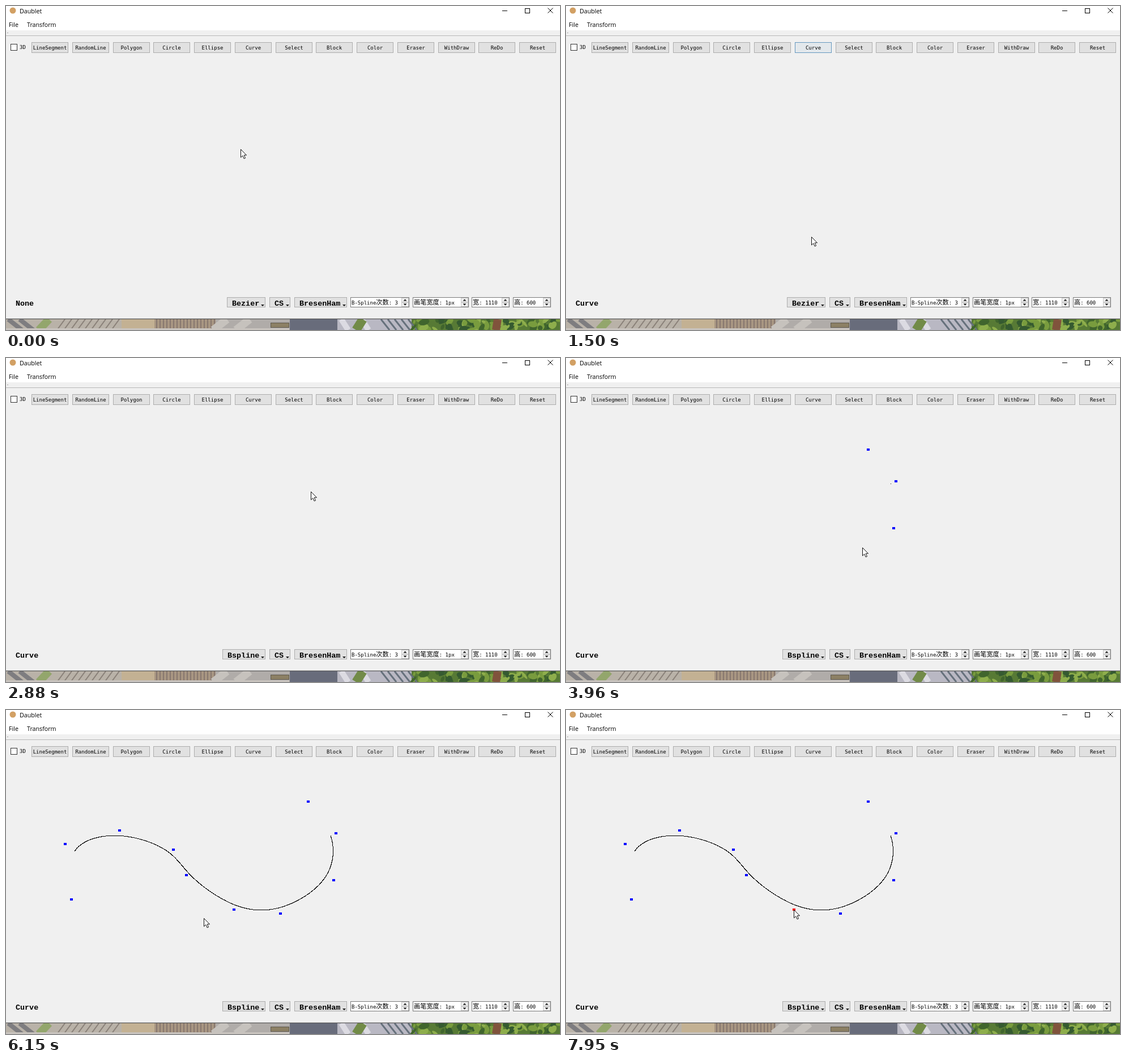
These frames come from a looping animation (978x573 px, 8000 ms). An HTML page with a canvas:

```html
<!DOCTYPE html>
<html lang="en">
<head>
<meta charset="utf-8">
<title>Daublet</title>
<style>
html, body { margin: 0; width: 978px; height: 573px; overflow: hidden; background: #f0f0f0; }
canvas { display: block; }
</style>
</head>
<body>
<canvas id="stage" width="978" height="573"></canvas>
<script>
const ctx = document.getElementById('stage').getContext('2d');
const LOOP = 8000;
const UI = '10.7px "Open Sans", sans-serif';
const MONO = '9px "DejaVu Sans Mono", monospace';
const CJK = '11.2px "Noto Sans CJK SC", "Noto Sans CJK", sans-serif';
const BOLD = 'bold 13.4px "Liberation Mono", monospace';
const TOOLS = ['LineSegment', 'RandomLine', 'Polygon', 'Circle', 'Ellipse', 'Curve', 'Select',
  'Block', 'Color', 'Eraser', 'WithDraw', 'ReDo', 'Reset'];

const stop = (x, y, arrive, leave = arrive) => ({ x, y, arrive, leave });

// The pointer clicks a control point when it leaves it
const POINTS = [
  stop(533, 162, 3060, 3100), stop(582, 218, 3410, 3440), stop(578, 301, 3700, 3750),
  stop(484, 360, 4130), stop(402, 353, 4440), stop(318, 292, 4720), stop(295, 247, 4940, 5090),
  stop(200, 213, 5260, 5410), stop(104, 237, 5620), stop(115, 335, 5850)];
const STOPS = [
  stop(414, 253, 0, 80), stop(436, 76, 820, 1060), stop(432, 523, 1720, 1970),
  stop(440, 562, 2300, 2610), stop(538, 236, 2880),
  ...POINTS,
  stop(373, 371, 6220), stop(431, 365, 6450), stop(401, 354, 6880, 7400), stop(402, 353, 7950, LOOP)];
const SELECTED = 4, SELECT_TIME = 7690;
const CLICK_TOOL = 970, CURVE_MODE = 1060, MENU_OPEN = 1970, MENU_CLOSE = 2610;

const ramp = (t, from, to) => Math.max(0, Math.min(1, (t - from) / (to - from)));
const mix = (a, b, k) => `rgb(${a.map((v, i) => Math.round(v + (b[i] - v) * k))})`;

function rect(x, y, w, h, color) {
  ctx.fillStyle = color;
  ctx.fillRect(x, y, w, h);
}

function frame(x, y, w, h, fill, border) {
  rect(x, y, w, h, border);
  rect(x + 1, y + 1, w - 2, h - 2, fill);
}

function poly(points, fill) {
  ctx.beginPath();
  points.forEach(p => ctx.lineTo(p[0], p[1]));
  ctx.closePath();
  ctx.fillStyle = fill;
  ctx.fill();
}

// Triangle around a middle point; a negative height points up
function arrow(x, y, height) {
  poly([[x - 3, y - height / 2], [x + 3, y - height / 2], [x, y + height / 2]], '#111');
}

function line(x1, y1, x2, y2, color, width = 1) {
  ctx.strokeStyle = color;
  ctx.lineWidth = width;
  ctx.beginPath();
  ctx.moveTo(x1, y1);
  ctx.lineTo(x2, y2);
  ctx.stroke();
}

function text(str, x, y, font, align = 'left') {
  ctx.font = font;
  ctx.textAlign = align;
  ctx.fillStyle = '#000';
  ctx.fillText(str, x, y);
}

function mixedText(str, x, y) {
  for (const run of str.match(/[\u4e00-\u9fff]+|[^\u4e00-\u9fff]+/g)) {
    text(run, x, y, run.charCodeAt(0) > 255 ? CJK : MONO);
    x += ctx.measureText(run).width;
  }
}

function button(x, y, w, h, hover = 0, pressed = false) {
  if (pressed) frame(x, y, w, h, '#cce4f7', '#005499');
  else frame(x, y, w, h, mix([225, 225, 225], [229, 241, 251], hover), mix([173, 173, 173], [0, 120, 215], hover));
}

function comboButton(label, x, right, hover, pressed) {
  button(x, 515, right - x, 18, hover, pressed);
  text(label, x + 9, 530, BOLD);
  arrow(right - 5, 529.5, 3);
}

function spinBox(label, x, right) {
  frame(x, 515, right - x, 18, '#fff', '#7a7a7a');
  mixedText(label, x + 2, 528);
  for (const side of [-1, 1]) {
    frame(right - 14, 520 + side * 4, 13, 8, '#f0f0f0', '#c8c8c8');
    arrow(right - 7.5, 524 + side * 4, side * 3);
  }
}

// Blurred street scene under the window: plain zones with seeded slanted strokes and leaves
function wallpaper() {
  let seed = 7;
  const rnd = (low, high) => low + (seed = seed * 16807 % 2147483647) / 2147483647 * (high - low);
  const pick = list => list[Math.floor(rnd(0, list.length))];
  const zones = [[0, '#b9b2a8'], [204, '#c3b193'], [262, '#a89682'], [370, '#b0aca9'],
    [501, '#686c7b'], [585, '#b9b8c3'], [716, '#577a35'], [978]];
  const strokes = (from, to, step, slant, color, width) => {
    for (let x = from; x < to; x += step) line(x, 554, x + slant, 573, color, width);
  };
  ctx.save();
  ctx.beginPath();
  ctx.rect(0, 554, 978, 19);
  ctx.clip();
  zones.slice(0, -1).forEach(([x, color], i) => rect(x, 554, zones[i + 1][0] - x, 19, color));
  strokes(4, 40, 20, 24, '#7e7d80', 8);
  strokes(76, 80, 20, -18, '#93a66c', 14);
  strokes(104, 204, 12, -14, '#8a8179', 2);
  strokes(266, 370, 6, 0, '#7c6d68', 1.5);
  strokes(390, 470, 40, -24, '#c6c2bd', 14);
  strokes(592, 660, 36, 12, '#dcdbe2', 10);
  strokes(630, 640, 20, -12, '#728b48', 16);
  strokes(662, 716, 12, 15, '#66717c', 3);
  frame(467, 560, 33, 9, '#8c8064', '#5f594f');
  rect(0, 570, 500, 3, '#c9c4bf');
  for (let i = 0; i < 85; i++) {
    ctx.beginPath();
    ctx.ellipse(rnd(718, 978), rnd(554, 573), rnd(3, 10), rnd(2, 6), rnd(0, 3), 0, 7);
    ctx.fillStyle = pick(['#799c3e', '#40652d', '#8eae4c', '#355a30']);
    ctx.fill();
  }
  strokes(868, 870, 20, -3, '#80533c', 14);
  ctx.restore();
  rect(0, 552, 978, 1, '#d0d0d0');
  rect(0, 553, 978, 1, '#565656');
}

function windowChrome() {
  rect(0, 0, 978, 573, '#f0f0f0');
  rect(0, 0, 978, 43, '#fff');
  ctx.beginPath();
  ctx.arc(12, 8, 5.5, 0, 7);
  ctx.fillStyle = '#d2a064';
  ctx.fill();
  text('Daublet', 24, 12.5, UI);
  text('File', 5, 36.5, UI);
  text('Transform', 37, 36.5, UI);
  rect(876, 8, 9, 1, '#000');
  frame(916, 4, 9, 9, '#fff', '#000');
  line(956.5, 3.5, 965.5, 12.5, '#000');
  line(965.5, 3.5, 956.5, 12.5, '#000');
  rect(2, 47, 2, 1, '#a0a0a0');
  rect(0, 52, 978, 1, '#b8b8b8');
  frame(8, 67, 12, 12, '#fff', '#333');
  text('3D', 24, 76, MONO);
}

function controls(t) {
  const curveHover = ramp(t, 690, 800) - ramp(t, 1200, 1720);
  TOOLS.forEach((name, i) => {
    const x = Math.round(45 + 71.75 * i), on = name === 'Curve';
    button(x, 64, 65, 19, on ? curveHover : 0, on && t >= CLICK_TOOL && t < CURVE_MODE);
    text(name, x + 32.5, 77, MONO, 'center');
  });
  text(t < CURVE_MODE ? 'None' : 'Curve', 17, 530, BOLD);
  const comboHover = ramp(t, 1680, 1720) - ramp(t, MENU_CLOSE, MENU_CLOSE + 200);
  const [mode, left] = t < MENU_CLOSE ? ['Bezier', 390] : ['Bspline', 382];
  comboButton(mode, left, 458, comboHover, t >= MENU_OPEN && t < MENU_CLOSE);
  comboButton('CS', 465, 502);
  comboButton('BresenHam', 509, 602);
  spinBox('B-Spline次数: 3', 608, 712);
  spinBox('画笔宽度: 1px', 718, 817);
  spinBox('宽: 1110', 822, 889);
  spinBox('高: 600', 895, 962);
}

function menu(t) {
  if (t < MENU_OPEN || t >= MENU_CLOSE) return;
  const y = mouse(t)[1];
  ctx.globalAlpha = ramp(t, MENU_OPEN - 30, MENU_OPEN + 90);
  frame(389, 533, 95, 45, '#f2f2f2', '#a0a0a0');
  ['Bezier', 'Bspline'].forEach((name, i) => {
    const top = 536 + 20 * i;
    if (y >= top && y < top + 20) rect(392, top, 89, 20, '#90c8f6');
    text(name, 418, top + 13, MONO);
  });
  ctx.globalAlpha = 1;
}

// Uniform cubic B-spline through four neighbouring control points
function splineAt(i, u) {
  const v = 1 - u;
  const weights = [v ** 3, 3 * u ** 3 - 6 * u * u + 4, 3 * v ** 3 - 6 * v * v + 4, u ** 3];
  return ['x', 'y'].map(axis => weights.reduce((sum, w, j) => sum + w * POINTS[i + j][axis], 0) / 6);
}

function drawing(t) {
  const shown = POINTS.filter(p => t >= p.leave);
  const plot = (i, u) => {
    const [x, y] = splineAt(i, u);
    rect(Math.floor(x - 0.1), Math.floor(y - 0.3), 1, 1, '#000');
  };
  if (shown.length === 3) plot(0, 0);
  for (let i = 0; i + 3 < shown.length; i++)
    for (let k = 0; k <= 200; k++) plot(i, k / 200);
  shown.forEach((p, i) =>
    rect(p.x - 2, p.y - 2, 5, 4, i === SELECTED && t >= SELECT_TIME ? '#f00' : '#00f'));
}

// Eased travel from stop to stop
function mouse(t) {
  const next = Math.max(1, STOPS.findIndex(s => s.leave > t));
  const a = STOPS[next - 1], b = STOPS[next];
  const u = ramp(t, a.leave, b.arrive), k = u * u * (3 - 2 * u);
  return [a.x + (b.x - a.x) * k, a.y + (b.y - a.y) * k].map(Math.round);
}

function pointer(t) {
  const [x, y] = mouse(t);
  ctx.save();
  ctx.translate(x + 0.5, y + 0.5);
  poly([[0, 0], [0, 14.3], [3.3, 11.2], [5.7, 16.5], [8, 15.5], [5.7, 10.3], [10, 10.3]], '#fff');
  ctx.strokeStyle = '#111';
  ctx.lineWidth = 1;
  ctx.stroke();
  ctx.restore();
}

function render(now) {
  const t = now % LOOP;
  windowChrome();
  wallpaper();
  controls(t);
  drawing(t);
  menu(t);
  pointer(t);
}

const start = performance.now();
function tick() {
  render(performance.now() - start);
  requestAnimationFrame(tick);
}
tick();
</script>
</body>
</html>
```
